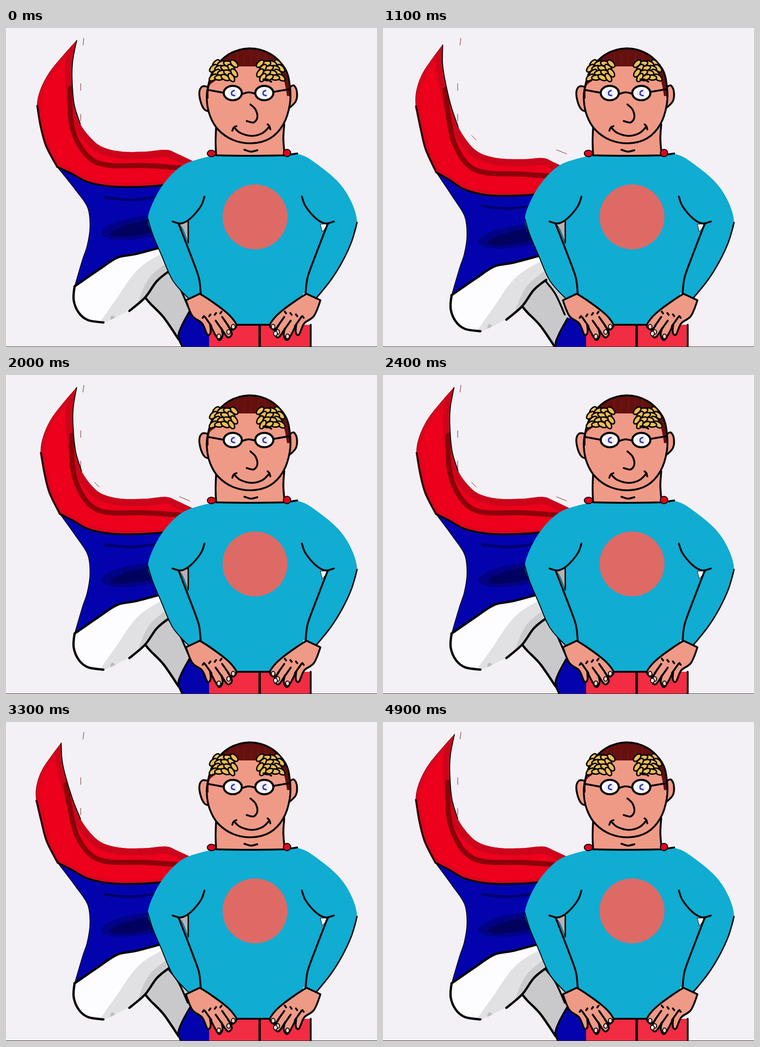
These frames come from a looping animation (800x689 px, 5000 ms). An HTML page with a canvas:

```html
<!DOCTYPE html>
<html lang="en">
<head>
<meta charset="utf-8">
<title>Caped band dad</title>
<style>
html, body { margin: 0; width: 100%; height: 100%; overflow: hidden; background: #f3f1f5; }
canvas { display: block; }
</style>
</head>
<body>
<canvas id="stage" width="800" height="689"></canvas>
<script>
const ctx = document.getElementById('stage').getContext('2d');
const LOOP = 5000, STEP = 100;
const SKIN = '#ef9a86', RED = '#ec001c', BLUE = '#0303ae', TEAL = '#10acd2', INK = '#050505';

const clamp = (v, lo = 0, hi = 1) => Math.min(hi, Math.max(lo, v));
const still = (x, y) => [x, y];
const mirror = (x, y) => [1066 - x, y];

// Two gusts per loop bend the tip, push the left bulge and lower the cloth
function capeWarp(t) {
  const gust = (peak, width) => Math.exp(-(((t - peak) / width) ** 2));
  const tip = -26 * gust(1000, 600) - 40 * gust(3500, 550);
  const bulge = 10 * gust(1700, 1000) + 9 * gust(4300, 700);
  const drop = 19 * gust(1100, 450) + 14 * gust(4100, 900);
  return (x, y) => {
    const up = clamp((190 - y) / 163) ** 1.2;
    const side = (1 - up) * clamp((400 - y) / 80) * clamp((200 - x) / 130);
    const low = clamp((y + x / 2 - 200) / 250);
    return [x + tip * up + bulge * side, y + tip * tip * 0.015 * up + drop * low];
  };
}

// Smooth curve through "x,y" points; "!" marks a sharp corner
function curve(text, warp = still, closed = false) {
  const pts = text.trim().split(/\s+/).map(s => {
    const [x, y] = s.replace('!', '').split(',').map(Number);
    return { p: warp(x, y), sharp: s.endsWith('!') };
  });
  const n = pts.length;
  const at = i => pts[closed ? (i + n) % n : clamp(i, 0, n - 1)];
  const slope = i => at(i).sharp ? [0, 0] : [0, 1].map(k => (at(i + 1).p[k] - at(i - 1).p[k]) / 6);
  const path = new Path2D();
  path.moveTo(...at(0).p);
  for (let i = 0; i < (closed ? n : n - 1); i++) {
    const [a, b, m, o] = [at(i).p, at(i + 1).p, slope(i), slope(i + 1)];
    path.bezierCurveTo(a[0] + m[0], a[1] + m[1], b[0] - o[0], b[1] - o[1], ...b);
  }
  if (closed) path.closePath();
  return path;
}

function paint(path, fill, width = 0, ink = INK) {
  if (fill) { ctx.fillStyle = fill; ctx.fill(path); }
  if (width) { ctx.strokeStyle = ink; ctx.lineWidth = width; ctx.stroke(path); }
}
const shape = (text, fill, width, warp) => paint(curve(text, warp, true), fill, width);
const line = (text, width = 4, warp, ink) => paint(curve(text, warp), null, width, ink);

function oval(x, y, rx, ry, fill, width, angle = 0) {
  const path = new Path2D();
  path.ellipse(x, y, rx, ry, angle, 0, 7);
  paint(path, fill, width);
}

// Fills an outline, then draws its shading inside it
function cloth(outline, fill, warp, shade) {
  const path = curve(outline, warp, true);
  paint(path, fill);
  ctx.save();
  ctx.clip(path);
  shade();
  ctx.restore();
}

function drawCape(t) {
  const w = capeWarp(t);
  for (const y of [22, 120, 186]) line(`${y < 99 ? 168 : 161},${y} ${y < 99 ? 166 : 161},${y + 15}`, 1, still, '#6d1018');
  if (t > 600 && t < 3000) {
    line('191,232 201,242', 1, still, '#6d1018');
    line('374,263 396,272', 1, still, '#6d1018');
  }

  const left = '154,27! 124,60 95,95 75,132 67,168 74,212 86,255 110,300!';
  const hem = '110,300! 140,314 175,332 225,342 290,343 350,338 420,325!';
  const inner = '420,296! 370,272 345,263 300,267 250,267 210,258 185,240 160,207 147,165 143,110 145,70 154,27!';
  const crest = '340,472! 280,488 240,496 200,522 148,558!';
  const flank = '148,558! 165,500 175,470 181,430 176,388 150,350 110,300!';
  const fold = '352,525! 325,547 300,582 266,611';
  const rim = '148,558! 146,588 157,615 177,631 210,636';

  shape('350,520! 300,580! 340,625 372,676! 400,640! 420,560!', '#c9c9cb', 0, w);
  shape('372,668! 378,645 398,608! 450,600! 450,720! 390,720!', BLUE, 0, w);
  line('398,608 379,643 372,668 384,695', 4, w);
  line('300,582! 312,596 340,625 372,672', 5, w);
  line('350,527 372,556 392,600', 4, w);

  cloth(`${rim} 250,618 285,598 325,547 352,525! 420,530! 420,480! ${crest}`, '#fdfdff', w, () => {
    const shadow = '230,650 262,605 310,540 380,500';
    line(shadow, 62, w, '#e1e1e4');
    line('300,600 325,547 380,505', 34, w, '#cbcbcf');
    oval(...w(230, 627), 5, 6, '#bdbdc0');
  });
  line(fold, 5, w);
  line(rim, 5, w);

  cloth(`${hem} ${crest} ${flank}`, BLUE, w, () => {
    oval(...w(290, 431), 86, 24, '#020286', 0, -0.15);
    oval(...w(300, 430), 76, 14, '#00005f', 0, -0.2);
    line('214,366 270,371 345,362', 6, w, '#00006e');
  });
  line(crest, 5, w);
  line(flank, 1.5, w);

  cloth(`${left} ${hem} ${inner}`, RED, w, () => {
    line(`${left} ${hem}`, 16, w, '#d9051d');
    line(inner, 30, w, '#cc051b');
    line('139,130 139,195 152,242 183,283 225,297 300,297 400,304', 11, w, '#8c0009');
  });
  line(hem, 4, w);
  line('67,168 74,212 86,255 110,300', 4, w);
  line(left, 1, w, '#8c0009');
  line('154,27 145,70 143,110 147,165 160,207', 2, w);
}

function drawHand(w) {
  shape('418,574! 440,588 470,610 487,626 497,642 488,652 478,642! 487,660 478,668 464,648! 467,664 458,673 440,640! 441,658 434,662 423,638 402,622 388,588!', SKIN, 4, w);
  for (const [x, y] of [[480, 644], [466, 652], [443, 644]]) line(`${x},${y} ${x - 14},${y - 20}`, 4, w);
  for (const x of [424, 438, 450, 462]) line(`${x},${732 - x / 4} ${x + 3},${728 - x / 4}`, 4, w);
  for (const x of [459, 480, 490]) oval(...w(x, 666 - (x - 459) ** 2 / 46), 4, 5, '#f6d3ca', 2);
}

function drawBody() {
  ctx.fillStyle = '#f22c42';
  ctx.fillRect(438, 641, 220, 48);
  line('547,641 547,689', 5);
  line('657,641 657,689', 4);

  shape('452,210! 453,275! 601,275! 600,205!', SKIN);
  line('453,215 452,245 453,275');
  line('600,208 598,240 601,275');
  line('514,263 528,267 542,264');

  const leftArm = '306,412 316,445 335,490 360,546 395,585!';
  const rightArm = '665,588! 700,545 725,505 745,462 757,420';
  shape(`453,275! 420,282 380,297 345,330 320,370 ${leftArm} 420,575! 440,600! 490,641! 577,641! 630,600! 642,572! ${rightArm} 743,372 712,328 655,283 628,272! 601,275!`, TEAL);
  line('453,275! 525,276 601,275! 628,271');
  line(leftArm, 2);
  line(rightArm, 3);
  line('395,585 420,573');
  line('490,641 577,641');
  oval(443, 271, 9, 7, '#e0041f', 2);
  oval(606, 270, 8, 8, '#e0041f', 2);

  shape('372,422! 393,418! 393,466! 382,436', '#b3b2b6', 1);
  shape('678,424! 698,422! 682,440!', '#f8f8fa', 1);
  for (const w of [still, mirror]) {
    line('428,364 420,385 398,411 378,422 359,418', 4, w);
    line('372,422 402,500 416,540 420,575', 4, w);
    drawHand(w);
  }
  line('393,418 393,463', 3);
  oval(581, 660, 4, 5, '#fff', 2);
  oval(537, 408, 70, 70, '#de6a66');
}

function drawLaurel(side) {
  for (let i = 0; i < 16; i++) {
    const row = i >> 2, col = i % 4;
    const x = 450 + 13 * col + (row % 2 ? -3 : 3), y = 77 + 10 * row;
    const angle = (col - 1.6 + row * 0.15) * 0.55;
    oval(side > 0 ? x : 1040 - x, y, 10, 5.5, '#efbd55', 3, side * angle);
  }
}

function drawHead() {
  shape('437,128! 424,126 417,138 420,160 428,176 438,180!', SKIN, 4);
  shape('610,130! 620,124 627,136 625,158 609,174!', SKIN, 4);
  const skull = '436,125 433,155 440,190 458,220 490,242 530,249 570,238 598,208 612,165 612,125 602,88 570,56 525,44 480,57 448,90';
  cloth(skull, SKIN, still, () => {
    shape('428,155! 437,152! 439,125 456,110 472,86 498,83! 545,83! 572,84 596,104 606,147! 620,148! 620,40! 428,40!', '#64100f');
    for (let x = 485; x < 575; x += 15) line(`${x},54 ${x - 2},78`, 2, still, '#74150f');
  });
  paint(curve(skull, still, true), null, 4);

  drawLaurel(1);
  drawLaurel(-1);
  line('555,111 563,111 572,116');
  line('437,134 470,140');
  line('577,138 612,132');
  line('508,143 523,139 538,142');
  for (const x of [489, 557]) {
    oval(x, 140.5, 19.5, 15.5, '#fff', 4.5);
    oval(x, 140.5, 10, 10, '#eeeef5');
    line(`${x + 3},135 ${x - 2},138 ${x - 2},144 ${x + 4},146`, 3, still, '#3434a5');
  }
  line('527,165 538,176 542,193 534,204 519,201');
  line('494,217 506,227 530,233 553,227 568,213');
  line('488,222 491,215 497,212');
  line('564,208 568,212 570,219');
}

const start = performance.now();

function frame() {
  const t = Math.floor(((performance.now() - start) % LOOP) / STEP) * STEP;
  ctx.fillStyle = '#f3f1f5';
  ctx.fillRect(0, 0, 800, 689);
  ctx.lineCap = ctx.lineJoin = 'round';
  drawCape(t);
  drawBody();
  drawHead();
  ctx.fillStyle = '#3a2426';
  ctx.fillRect(0, 688, 800, 1);
  requestAnimationFrame(frame);
}
frame();
</script>
</body>
</html>
```
